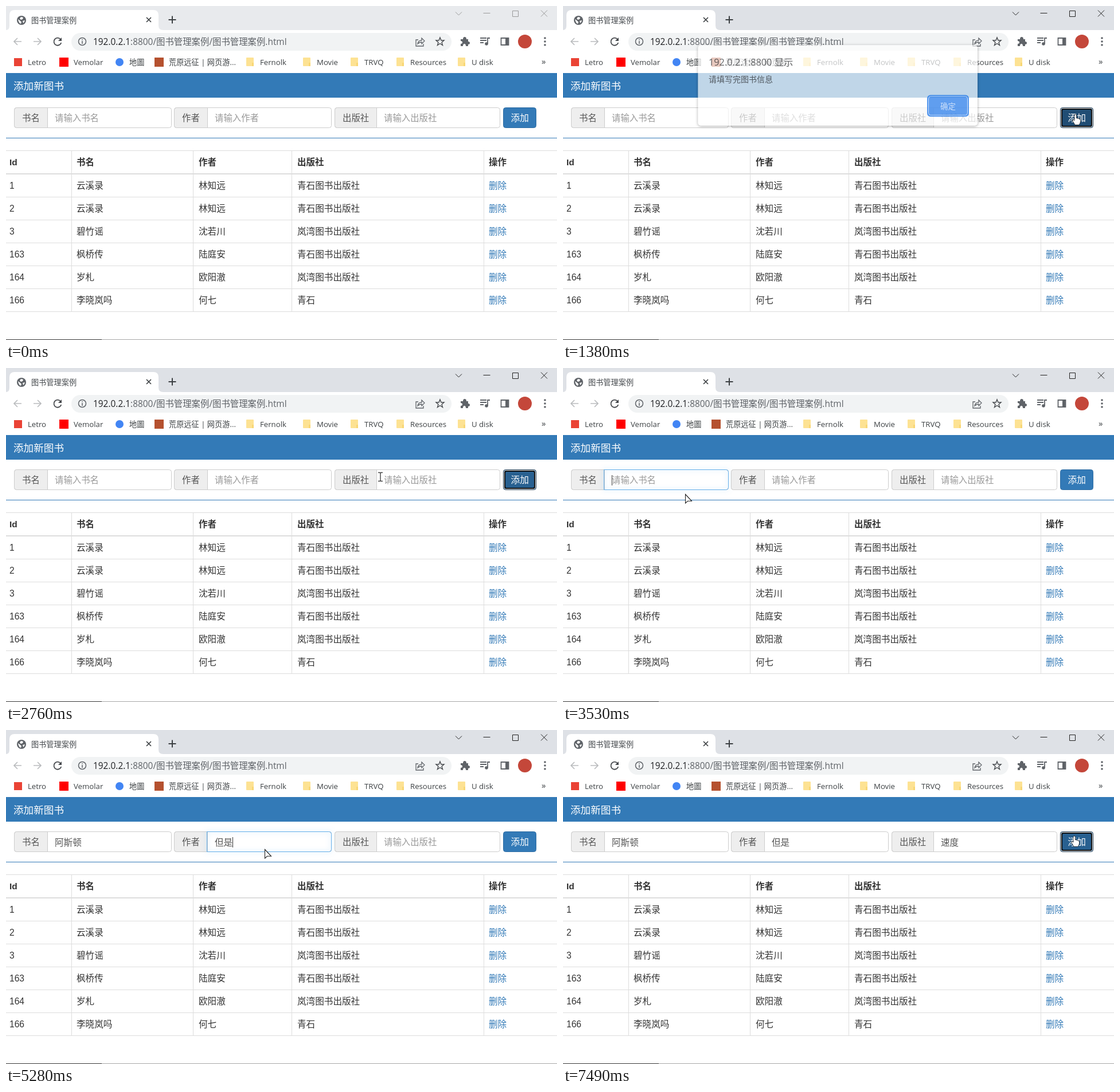
These frames come from a looping animation (961x583 px, 8 s). An HTML page with a canvas:

```html
<!DOCTYPE html>
<html lang="zh-CN">
<head>
<meta charset="utf-8">
<style>
html, body { margin: 0; width: 100%; height: 100%; overflow: hidden; background: #fff; }
canvas { display: block; }
</style>
</head>
<body>
<canvas id="stage" width="961" height="583"></canvas>
<script>
const ctx = document.getElementById('stage').getContext('2d');
const LOOP = 8000;
const CJK = '"Noto Sans CJK SC", "Noto Sans CJK", sans-serif';
const PAGE = '"Liberation Sans", ' + CJK;
const UI = '"Open Sans", ' + CJK;
const HOST = '192.0.2.1', PORT = ':8800';

const rows = [
  ['1', '云溪录', '林知远', '青石图书出版社'],
  ['2', '云溪录', '林知远', '青石图书出版社'],
  ['3', '碧竹谣', '沈若川', '岚湾图书出版社'],
  ['163', '枫桥传', '陆庭安', '青石图书出版社'],
  ['164', '岁札', '欧阳澈', '岚湾图书出版社'],
  ['166', '李晓岚吗', '何七', '青石']
];
const columns = [6, 123, 336, 508, 842];

const fields = [
  { x: 14, input: 72, end: 289, label: '书名', focus: 3160, blur: 4800, type: 4210, commit: 4380,
    keys: 'asd', words: ['阿斯顿', '按时到', '按时的', '爱上的', '暗示的'] },
  { x: 293, input: 351, end: 568, label: '作者', focus: 4800, blur: 5650, type: 5080, commit: 5280,
    keys: 'ds', words: ['但是', '都是', '电视', '大师', '当时'] },
  { x: 573, input: 646, end: 862, label: '出版社', focus: 5650, blur: 7110, type: 6000, commit: 6200,
    keys: 'sd', words: ['速度', '时代', '受到', '适当', '深度'] }
];

// start, end, target x, target y, downward bend
const pointerStart = [936, 583];
const moves = [
  [420, 840, 892, 181, 0], [1020, 1050, 894, 189, 0], [1630, 2140, 670, 184, 40],
  [2750, 2760, 653, 190, 0], [2770, 3120, 160, 196, 0], [3200, 3530, 213, 220, 0],
  [3690, 3750, 204, 218, 0], [4540, 4780, 451, 200, 0], [4860, 4980, 451, 208, 0],
  [5350, 5640, 745, 199, 0], [6400, 6750, 888, 182, 0], [7430, 7490, 892, 185, 0]
];

const within = (t, a, b) => t >= a && t < b;
const ramp = (t, a, b) => Math.min(1, Math.max(0, (t - a) / (b - a)));

function text(s, x, middle, size, color, font = UI, weight = '') {
  ctx.font = `${weight} ${size}px ${font}`;
  ctx.fillStyle = color;
  ctx.fillText(s, x, middle + size * 0.37);
  return x + ctx.measureText(s).width;
}

function rect(x, y, w, h, color) {
  ctx.fillStyle = color;
  ctx.fillRect(x, y, w, h);
}

function box(x, y, w, h, r, fill, stroke, width = 1) {
  ctx.beginPath();
  ctx.roundRect(x, y, w, h, r);
  if (fill) { ctx.fillStyle = fill; ctx.fill(); }
  if (stroke) { ctx.strokeStyle = stroke; ctx.lineWidth = width; ctx.stroke(); }
}

function disc(x, y, r, color) {
  box(x - r, y - r, 2 * r, 2 * r, r, color);
}

function icon(x, y, d, stroke, width = 1.5, fill) {
  const path = new Path2D(d);
  ctx.save();
  ctx.translate(x, y);
  if (fill) { ctx.fillStyle = fill; ctx.fill(path); }
  if (stroke) { ctx.strokeStyle = stroke; ctx.lineWidth = width; ctx.stroke(path); }
  ctx.restore();
}

function drawBrowser(active) {
  const ink = '#5f6368', control = active ? '#222' : '#9a9a9a';
  rect(0, 0, 961, 42, active ? '#dee1e6' : '#e8eaed');
  icon(0, 0, 'M0 42Q6 42 6 34V16Q6 7 15 7H257Q266 7 266 16V34Q266 42 274 42Z', null, 0, '#fff');
  disc(27, 25, 8, ink);
  icon(27, 25, 'M-6-2Q-3 0-2 1L0 3L-1 6Q-5 5-6-2ZM-1-6L3-5L2-2L-1-1L-3-3ZM2 1L6 0Q5 4 3 5Z', null, 0, '#fff');
  text('图书管理案例', 44, 25, 13.2, '#45494d');
  icon(249, 24, 'M-4-4L4 4M4-4L-4 4', '#3c4043', 1.7);
  icon(290, 24, 'M-6.5 0H6.5M0-6.5V6.5', '#3c4043', 2);
  icon(789.5, 13, 'M-5.5-2.5L0 3L5.5-2.5', control, 1);
  icon(838.5, 12.5, 'M-6 0H6', control, 1);
  icon(888.5, 13.5, 'M-5-5H5V5H-5Z', control, 1);
  icon(938.5, 13, 'M-5.5-5.5L5.5 5.5M5.5-5.5L-5.5 5.5', control, 1);

  icon(20, 62, 'M7 0H-6M0-6L-6 0L0 6', '#babcbe', 1.7);
  icon(55, 62, 'M-7 0H6M0-6L6 0L0 6', '#babcbe', 1.7);
  icon(90, 62, 'M5-4A6.5 6.5 0 1 0 6.3 2', '#46494d', 1.8);
  icon(90, 62, 'M7-7V-1H1Z', null, 0, '#46494d');
  box(114, 47, 663, 31, 15.5, '#f1f3f4');
  icon(133, 62, 'M-6.5 0A6.5 6.5 0 1 0 6.5 0A6.5 6.5 0 1 0-6.5 0M0-1V4M0-4V-2.4', ink, 1.5);
  const x = text(HOST, 152, 62, 15.4, '#202124');
  text(PORT + '/图书管理案例/图书管理案例.html', x, 62, 15.4, ink);
  icon(722, 63, 'M-3-4H-7V7H6V3M-4 3Q-3-3 3-3V-7L8-2L3 3V0Q-1 0-4 3Z', ink, 1.3);
  icon(757, 62, 'M0-7L2-2L7-2L3 1.5L4.5 6.5L0 3.5L-4.5 6.5L-3 1.5L-7-2L-2-2Z', '#46494d', 1.4);
  icon(800, 62, 'M-7-4H-3Q-3-8 0-8Q3-8 3-4H6V0Q9 0 9 2.5Q9 5 6 5V8H2Q2 4-.5 4Q-3 4-3 8H-7V4Q-4 4-4 1.5Q-4-1-7-1Z', null, 0, ink);
  icon(835, 62, 'M-8-6H3M-8-2H3M-8 2H-2M5 4V-6H9', ink, 1.8);
  disc(838, 66, 2.8, ink);
  icon(870, 62, 'M-6.5-6H6.5V6H-6.5Z', ink, 1.8);
  rect(871, 56, 6, 12, ink);
  disc(905, 62, 12, '#c4473a');
  for (const dy of [-6, 0, 6]) disc(940, 62 + dy, 1.8, ink);

  rect(14, 91, 14, 14, '#ea4335');
  rect(93, 90, 16, 16, '#f00');
  disc(198, 98, 7, '#4285f4');
  rect(259, 90, 16, 16, '#b5512f');
  const marks = [[38, 'Letro'], [118, 'Vemolar'], [215, '地圖'], [284, '荒原远征 | 网页游...'],
    [443, 'Fernolk'], [542, 'Movie'], [625, 'TRVQ'], [705, 'Resources'], [812, 'U disk']];
  marks.forEach(([left, name], i) => {
    text(name, left, 98, 13.2, '#3c4043');
    if (i > 3) {
      box(left - 24, 90, 13, 15, 1, '#fde293');
      rect(left - 14, 99, 3, 6, '#f8d775');
    }
  });
  text('»', 934, 96, 15, '#3c4043');
}

function drawTable() {
  const line = '#ddd';
  rect(0, 252, 961, 1, line);
  rect(0, 292, 961, 2, line);
  for (let i = 1; i <= rows.length; i++) rect(0, 293 + i * 40, 961, 1, line);
  for (const x of [114, 326, 498, 833]) rect(x, 252, 1, 282, line);
  ['Id', '书名', '作者', '出版社', '操作'].forEach((s, i) =>
    text(s, columns[i], 272, 15.5, '#333', PAGE, 'bold'));
  rows.forEach((row, r) => [...row, '删除'].forEach((s, c) =>
    text(s, columns[c], 313 + r * 40, 15.6, c === 4 ? '#337ab7' : '#333', PAGE)));
  rect(0, 582, 961, 1, '#a5a5a5');
  rect(0, 582, 167, 1, '#333');
}

function drawField(f, t) {
  const focused = within(t, f.focus, f.blur);
  const left = f.input + 13;
  box(f.x + .5, 177.5, f.end - f.x - 1, 35, 4, '#fff', '#ccc');
  box(f.x + .5, 177.5, f.input - f.x, 35, [4, 0, 0, 4], '#eee', '#ccc');
  text(f.label, f.x + 14, 195, 15.4, '#555', PAGE);
  const glow = ramp(t, f.focus, f.focus + 150) - ramp(t, f.blur, f.blur + 150);
  if (glow > 0) {
    ctx.save();
    ctx.globalAlpha = glow;
    ctx.shadowColor = 'rgba(102,175,233,.7)';
    ctx.shadowBlur = 8;
    box(f.input - .5, 177.5, f.end - f.input, 35, [0, 4, 4, 0], null, '#66afe9');
    ctx.restore();
  }
  let end = left;
  if (t < f.type) {
    text('请输入' + f.label, left, 195, 15.4, '#999', PAGE);
  } else {
    const typed = f.keys.slice(0, 1 + Math.floor((t - f.type) / 45));
    end = text(t < f.commit ? typed : f.words[0], left, 196, 15.6, '#555', PAGE);
    if (t < f.commit) rect(left, 204, end - left, 1, '#555');
  }
  const last = t >= f.commit ? f.commit : t >= f.type ? f.type : f.focus;
  if (focused && Math.floor((t - last) / 530) % 2 === 0) rect(Math.round(end), 187, 1, 18, '#333');
}

function drawCandidates(f) {
  const left = f.input + 1;
  box(left + .5, 208.5, 642, 42, 5, '#f9f9f9', '#d0d0d0');
  f.words.forEach((word, i) => {
    const x = left + 16 + i * 105;
    if (!i) box(left + 6, 214, 96, 31, 4, '#e6e6e6');
    text(`${i + 1}  ${word}`, x, 230, 16, '#222');
  });
}

function drawButton(t, hover) {
  const pressed = within(t, 1190, 2440) || within(t, 7110, 7270);
  const focused = within(t, 1190, 3160) || t >= 7110;
  const fill = pressed ? '#204d74' : focused || hover ? '#286090' : '#337ab7';
  box(867.5, 177.5, 57, 35, 4, fill, focused ? '#122b40' : hover ? '#204d74' : '#2e6da4');
  if (focused) {
    box(868.5, 178.5, 55, 33, 3, null, '#fff');
    box(870, 180, 52, 30, 3, null, '#101010', 2);
  }
  text('添加', 880.5, 195, 15.7, '#fff', PAGE);
}

// Shadow outside the panel only, so that a translucent panel stays clean
function drawPanelShadow(x, y, w, h, r) {
  ctx.save();
  ctx.beginPath();
  ctx.rect(0, 0, 961, 640);
  ctx.roundRect(x, y, w, h, r);
  ctx.clip('evenodd');
  ctx.shadowColor = 'rgba(0,0,0,.5)';
  ctx.shadowBlur = 5;
  ctx.shadowOffsetY = 1;
  box(x, y, w, h, r, '#fff');
  ctx.restore();
}

function drawDialog(t) {
  const opening = 1 - (1 - ramp(t, 1310, 1470)) ** 2;
  const alpha = opening * (1 - ramp(t, 2470, 2600));
  if (alpha <= 0) return;
  ctx.save();
  ctx.globalAlpha = alpha;
  ctx.translate(0, -22 * (1 - alpha));
  drawPanelShadow(235.5, 75, 487.5, 140.5, 5);
  box(235.5, 75, 487.5, 140.5, 5, '#fff');
  text(HOST + PORT + ' 显示', 254, 105, 16.3, '#202124');
  text('请填写完图书信息', 254, 134.5, 14, '#202124');
  box(636.5, 163.5, 70, 35, 4, '#1a73e8');
  if (t < 2340) {
    box(637.5, 164.5, 68, 33, 4, null, '#fff');
    box(636, 163, 71, 36, 5, null, '#1a73e8', 2);
  }
  text('确定', 658, 181.5, 13.4, '#fff', UI, 500);
  ctx.restore();
}

function pointerAt(t) {
  let [x, y] = pointerStart;
  for (const [start, end, toX, toY, bend] of moves) {
    if (t < start) break;
    const p = ramp(t, start, end), e = p * p * (3 - 2 * p);
    x += (toX - x) * e;
    y += (toY - y) * e + bend * 4 * e * (1 - e);
  }
  return [x, y];
}

function drawPointer(x, y, kind) {
  if (kind === 'hand') {
    icon(x, y, 'M-2 1Q0-1 1.5 1V7Q3 6 4 7.5Q6 6.5 6.5 8.5Q8.5 8 8.5 10V13Q8 17 5.5 18.5H-1Q-3 15-5 12Q-6 9-4 9.5L-2 11Z',
      '#222', .8, '#fff');
  } else if (kind === 'beam') {
    icon(x, y, 'M-4-7.5H-1L0-6.5L1-7.5H4M-4 7.5H-1L0 6.5L1 7.5H4M0-6.5V6.5', '#444', 1.4);
  } else {
    icon(x, y, 'M.5.5V16L4.5 12.3H11.5Z', '#222', 1.1, '#fff');
  }
}

function draw(t) {
  const [x, y] = pointerAt(t);
  const inLine = within(y, 177, 213);
  const composing = fields.find(f => within(t, f.type, f.commit));
  const blocked = within(t, 1630, 2440);
  const hover = !blocked && inLine && within(x, 867, 925);

  rect(0, 0, 961, 583, '#fff');
  drawBrowser(t >= 1190);
  rect(0, 117, 961, 43, '#337ab7');
  text('添加新图书', 13, 139, 17.6, '#fff', PAGE);
  rect(0, 230, 961, 1, '#337ab7');
  fields.forEach(f => drawField(f, t));
  drawButton(t, hover);
  drawTable();
  drawDialog(t);
  if (composing) drawCandidates(composing);

  if (t < 420) return;
  const overInput = inLine && fields.some(f => within(x, f.input, f.end));
  const overCandidates = y > 207 && within(t, 5080, 5350);
  drawPointer(x, y, hover ? 'hand' : overInput && !blocked && !overCandidates ? 'beam' : 'arrow');
}

const begin = performance.now();
function tick() {
  draw((performance.now() - begin) % LOOP);
  requestAnimationFrame(tick);
}
tick();
</script>
</body>
</html>
```
